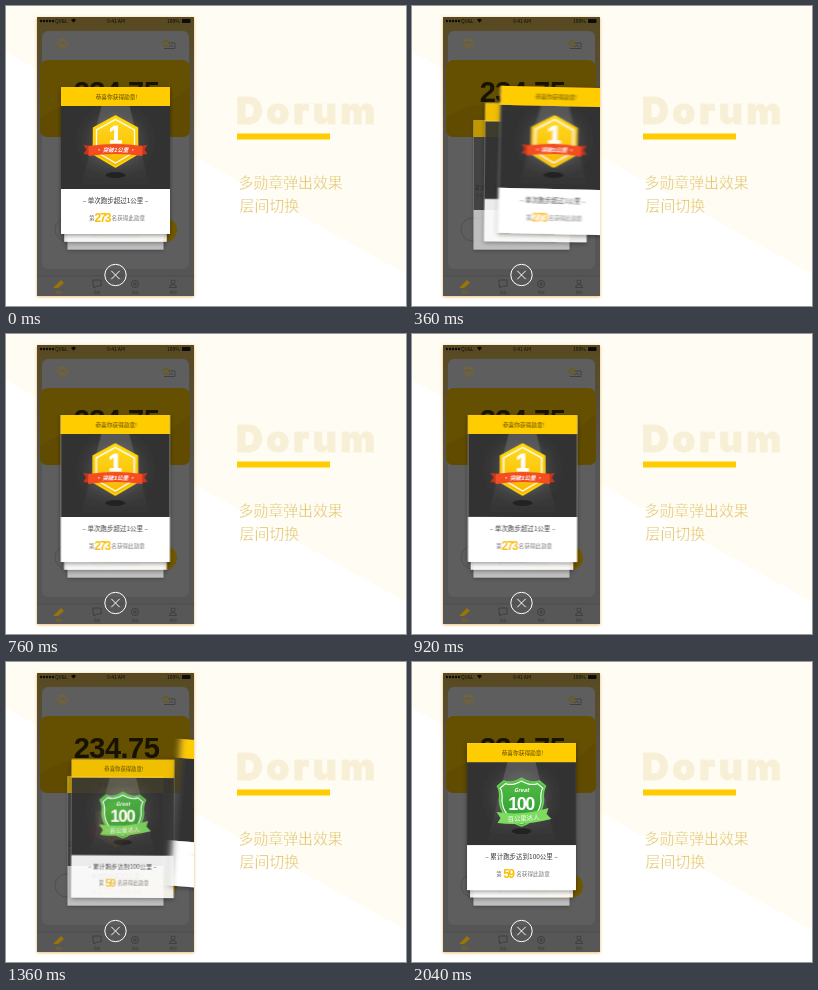
Animation, 400 px wide and 300 px high, one loop 3 s. Source, as an HTML page:

```html
<!DOCTYPE html>
<html lang="zh">
<head>
<meta charset="utf-8">
<title>多勋章弹出效果</title>
<style>
  html, body { margin: 0; width: 100%; height: 100%; overflow: hidden; background: #fff; }
  svg { display: block; width: 400px; height: 300px; }
  text { font-family: "Noto Sans CJK SC", "Noto Sans CJK", "Noto Sans", sans-serif; }
  .mid { text-anchor: middle; }
  .num { font-family: "Liberation Sans", sans-serif; font-weight: 700; }
  .title { font: 900 37px Inter, sans-serif; letter-spacing: 3.6px; fill: #f8efd7; stroke: #f8efd7; stroke-width: .9; }
  .lead { font-size: 14.9px; font-weight: 300; fill: #dfc263; stroke: #fffdf7; stroke-width: .35; }
  .tiny { font-size: 3.6px; fill: #383838; }
  .status { font: 400 5px "Liberation Sans", sans-serif; fill: #0c0c0c; }
  .line { fill: none; stroke: #343434; stroke-width: .7; }
  .gold { fill: none; stroke: #8a6808; stroke-width: 1; }
</style>
</head>
<body>
<svg viewBox="0 0 400 300">
  <defs>
    <clipPath id="screen"><rect x="31" y="11" width="157" height="279"/></clipPath>
    <filter id="glow" x="-10%" y="-10%" width="120%" height="120%">
      <feDropShadow dx="0" dy=".8" stdDeviation="1.7" flood-color="#eaa840" flood-opacity=".85"/>
    </filter>
    <linearGradient id="phone" x2="0" y2="1">
      <stop offset="0" stop-color="#584a20"/>
      <stop offset=".45" stop-color="#555"/>
    </linearGradient>
    <radialGradient id="spot" cx=".5" cy=".42" r=".5">
      <stop offset="0" stop-color="#777"/>
      <stop offset=".55" stop-color="#4a4a4a" stop-opacity=".75"/>
      <stop offset="1" stop-color="#333" stop-opacity="0"/>
    </radialGradient>
    <linearGradient id="beam" x2="0" y2="1">
      <stop offset="0" stop-color="#fff" stop-opacity=".16"/>
      <stop offset="1" stop-color="#fff" stop-opacity="0"/>
    </linearGradient>
    <linearGradient id="amber" x2="0" y2="1">
      <stop offset="0" stop-color="#ffdc1e"/>
      <stop offset="1" stop-color="#f8b600"/>
    </linearGradient>
    <linearGradient id="leaf" x2="0" y2="1">
      <stop offset="0" stop-color="#52bd45"/>
      <stop offset="1" stop-color="#2a9a30"/>
    </linearGradient>
  </defs>

  <path d="M0 0H400V268L0 46Z" fill="#fffcf3"/>
  <text class="title" x="230" y="118">Dorum</text>
  <rect x="231" y="127.500" width="93" height="6" fill="#fc0"/>
  <text class="lead" x="232.500" y="182">多勋章弹出效果</text>
  <text class="lead" x="233.500" y="204.500">层间切换</text>

  <rect x="31" y="11" width="157" height="279" fill="url(#phone)" filter="url(#glow)"/>
  <g clip-path="url(#screen)">
    <rect x="36" y="25" width="147" height="238" rx="6" fill="#5e5e5e"/>
    <g class="status">
      <g id="signal"></g>
      <text x="49" y="17">QV&amp;L</text>
      <path d="M65 13.800q2.500-2 5 0l-2.500 3z"/>
      <text class="mid" x="110" y="17">9:41 AM</text>
      <text x="161" y="17">100%</text>
      <rect x="176" y="13" width="8.500" height="4" rx=".8"/>
    </g>
    <path class="gold" d="M53.500 34h6l2 3.500-5 5.500-5-5.500zM54.500 37.500l2 2.500 2-2.500"/>
    <path d="M163 37h6v5.500h-11" class="line"/>
    <path d="M163 41l2-2 2 2" class="line"/>
    <circle cx="160" cy="37.500" r="2.600" fill="none" stroke="#6b5c14" stroke-width="1.300"/>
    <rect x="34" y="54" width="150" height="77" rx="8" fill="#654f00"/>
    <path d="M34 112q30-22 70-8t80-24v43q0 8-8 8H42q-8 0-8-8z" fill="#604b00"/>
    <text class="num mid" x="110.500" y="95.500" font-size="29" letter-spacing="-.5" fill="#171300">234.75</text>
    <text class="num" x="63" y="184" font-size="8" fill="#333">2:06</text>
    <text class="tiny" x="64" y="191">时长</text>
    <rect x="49" y="212" width="56" height="23" rx="11.500" class="line" stroke-opacity=".5"/>
    <rect x="113" y="212" width="58" height="24" rx="12" fill="#705800"/>
    <rect x="31" y="270" width="157" height="20" fill="#575757"/>
    <path d="M31 270H188" stroke="#4a4a4a" stroke-width=".7"/>
    <path d="M48 281l7-7 3 3-6 5h-4z" fill="#997408"/>
    <g class="line">
      <path d="M87 274h8v6h-4l-3 2v-2h-1z"/>
      <circle cx="129" cy="278" r="3.600"/><circle cx="129" cy="278" r="1.300"/>
      <circle cx="167" cy="276" r="2"/><path d="M163.500 281.500q0-3 3.500-3t3.500 3z"/>
    </g>
    <g class="tiny mid">
      <text x="53" y="288" fill="#8a6d00">跑步</text><text x="91" y="288">消息</text>
      <text x="129" y="288">发现</text><text x="167" y="288">我的</text>
    </g>
    <g id="stack"></g>
    <g fill="none" stroke="#fff">
      <circle cx="109.500" cy="269" r="10.700"/>
      <path d="M105.300 264.800l8.400 8.400m0-8.400l-8.400 8.400"/>
    </g>
  </g>
</svg>

<script>
const LOOP = 3000, REST = 2040, STEP = 40;
const $ = id => document.getElementById(id);
const clamp = (v, lo = 0, hi = 1) => Math.min(hi, Math.max(lo, v));
const smooth = u => { u = clamp(u); return u * u * (3 - 2 * u); };

// Card space: origin at the bottom centre, 109 wide and 147 high.
const firstMedal = `
  <path d="M0-118L22-106V-80L0-67L-22-80V-106Z" fill="url(#amber)" stroke="#ffd400" stroke-width="1.500" stroke-linejoin="round"/>
  <path d="M0-114.500L19-104V-82L0-71L-19-82V-104Z" fill="none" stroke="#fff" stroke-width="1.300"/>
  <text class="num mid" y="-91" font-size="24" fill="#fff" stroke="#fff" stroke-width=".8">1</text>
  <path d="M-32-89l9 1v9l-9-1 3-4.500zM32-89l-9 1v9l9-1-3-4.500z" fill="#c93618"/>
  <path d="M-27-88Q0-92 27-88V-78Q0-82-27-78Z" fill="#f44e24"/>
  <text class="mid" y="-82" font-size="5.600" font-weight="700" font-style="italic" fill="#fff">• 突破1公里 •</text>`;

const shield = "M0-112Q10-106 18-109L24-104Q21-99 22-90Q21-72 0-64Q-21-72-22-90Q-21-99-24-104L-18-109Q-10-106 0-112Z";
const hundredMedal = `
  <path d="${shield}" fill="url(#leaf)" stroke="#68cf52" stroke-width="1.600"/>
  <path d="${shield}" transform="translate(0 -9.500) scale(.89)" fill="none" stroke="#fff" stroke-width="1.400"/>
  <text class="mid" y="-98" font-size="5.600" font-weight="700" font-style="italic" fill="#fff">Great</text>
  <text class="num mid" x="-.5" y="-80.500" font-size="18" letter-spacing="-1.500" fill="#fff">100</text>
  <path d="M-25-78Q2-74 27-82L25-76L30-71Q2-64-24-67L-21-72Z" fill="#7edb61"/>
  <text class="mid" x="2" y="-69.500" font-size="6.400" fill="#fff" transform="rotate(-4 0 -72)">百公里达人</text>`;

function cardMarkup(id, medal, deed, rank, gap) {
  return `<filter id="blur${id}" x="-20%" y="-10%" width="140%" height="120%">
      <feGaussianBlur stdDeviation="0 0" result="b"/>
      <feDropShadow in="b" dx="0" dy="1.500" stdDeviation="2" flood-opacity=".4"/>
    </filter>
    <g id="card${id}">
      <rect x="-54.500" y="-147" width="109" height="147" fill="#fff"/>
      <rect x="-54.500" y="-128" width="109" height="83" fill="#333"/>
      <rect x="-42" y="-128" width="84" height="83" fill="url(#spot)"/>
      <path d="M-14-128H14L34-48H-34Z" fill="url(#beam)"/>
      <ellipse cx="0" cy="-59" rx="10" ry="3" fill="#1a1a1a" opacity=".7"/>
      <rect x="-54.500" y="-147" width="109" height="19" fill="#fc0"/>
      <text class="mid" x="1" y="-135.300" font-size="5.700" fill="#564400">恭喜你获得勋章!</text>
      ${medal}
      <text class="mid" y="-31" font-size="6.500" fill="#333">– ${deed} –</text>
      <text class="mid" x="1.500" y="-13.800" font-size="5.600" fill="#777">第<tspan
        class="num" dx="${gap}" dy="1.700" font-size="12" letter-spacing="-1.500" fill="#fcbf00">${rank}</tspan><tspan
        dx="${gap + 1.5}" dy="-1.700">名获得此勋章</tspan></text>
    </g>`;
}

const first = [firstMedal, "单次跑步超过1公里", 273, 0];
const hundred = [hundredMedal, "累计跑步达到100公里", 59, 1.3];
$("stack").innerHTML = [first, first, hundred, first]
  .map((card, i) => cardMarkup(3 - i, ...card)).join("");
$("signal").innerHTML = Array.from({ length: 5 }, (_, i) =>
  `<circle cx="${35 + i * 3}" cy="15" r="1.200"/>`).join("");

const cards = [0, 1, 2, 3].map(i => {
  const el = $("card" + i);
  el.setAttribute("filter", `url(#blur${i})`);
  return { el, blur: $("blur" + i).firstElementChild };
});

// Pull right, spring back, then throw off the right edge.
function frontX(t) {
  const s = t - 474;
  const pull = s < 0
    ? 43.5 * smooth(Math.pow(clamp((t - 20) / 454), 1.4))
    : 43.5 * Math.exp(-.0068 * s) * Math.cos(Math.PI * s / 192);
  return pull + 150 * Math.pow(clamp((t - 940) / 460), 3);
}

const secondX = t => Math.min(frontX(t) * .45, t < 900 ? 99 : 16) * (1 - smooth((t - 1200) / 300));

// Underdamped rise from 0 to 1.
const rise = s => s <= 0 ? 0 : 1 - Math.exp(-.004 * s) * Math.cos(.0075 * s);

function place(card, x, depth, speed, lift = 0) {
  const scale = 1 - .06 * depth, bottom = 228 + 7.8 * depth - lift;
  card.el.setAttribute("transform",
    `translate(${109.5 + x} ${bottom}) scale(${scale}) rotate(${x * .04} 0 -73)`);
  card.el.setAttribute("opacity", 1 - .1 * Math.max(depth, 0) ** 2);
  card.blur.setAttribute("stdDeviation", `${clamp(Math.abs(speed) * .13 - .05, 0, 4)} 0`);
}

function draw(t) {
  const x0 = frontX(t), x1 = secondX(t);
  place(cards[0], x0, 0, x0 - frontX(t - STEP));
  place(cards[1], x1, 1 - rise(t - 1400), x1 - secondX(t - STEP));
  place(cards[2], 0, 2 - rise(t - 1480), 0);
  place(cards[3], 0, 2, 0, 12 * (1 - smooth((t - 1580) / 320)));
  cards[0].el.style.display = t < 1400 ? "" : "none";
  cards[3].el.style.display = t < 1600 ? "none" : "";
}

const start = performance.now();
function tick() {
  const t = (performance.now() - start) % LOOP;
  draw(Math.min(Math.floor(t / STEP) * STEP, REST));
  requestAnimationFrame(tick);
}
tick();
</script>
</body>
</html>
```
